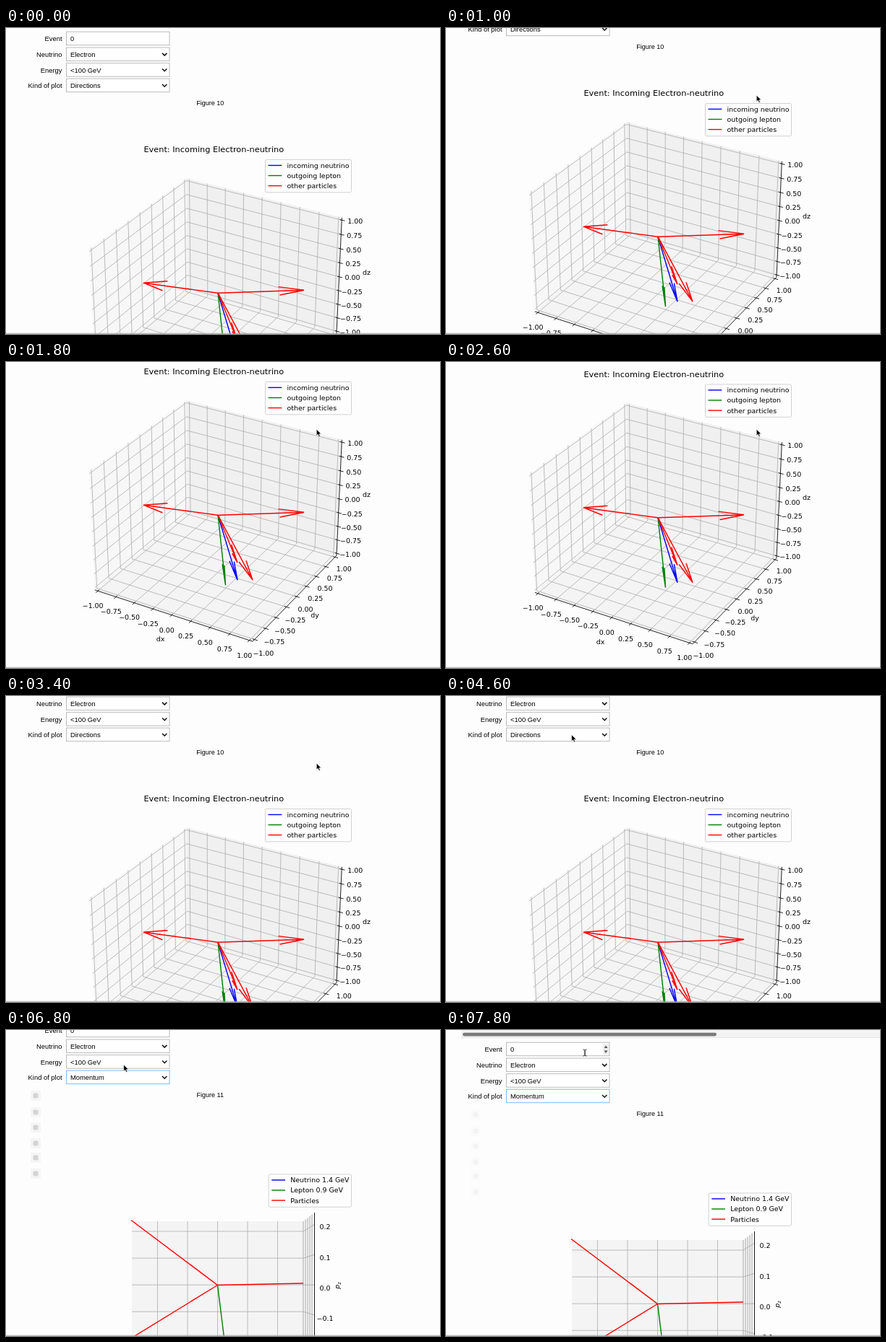
These frames come from a looping animation (600x424 px, 8000 ms). An HTML page:

```html
<!DOCTYPE html>
<html lang="en">
<head>
<meta charset="utf-8">
<title>Neutrino event viewer</title>
<style>
  html, body { margin: 0; width: 100%; height: 100%; overflow: hidden; background: #fdfdfd; }
  svg { display: block; width: 600px; height: 424px; }
  .ui { font: 9.4px "Liberation Sans", Arial, sans-serif; }
  .plot { font: 9.43px "DejaVu Sans", sans-serif; }
</style>
</head>
<body>
<svg id="stage" viewBox="0 0 600 424"></svg>
<script>
const LOOP = 8000, STEP = 200;
const stage = document.getElementById('stage');

function add(parent, tag, attrs = {}, content) {
  const node = document.createElementNS('http://www.w3.org/2000/svg', tag);
  for (const key in attrs) node.setAttribute(key, attrs[key]);
  if (content !== undefined) node.textContent = content;
  parent.append(node);
  return node;
}
const group = (parent, cls = '') => add(parent, 'g', { class: cls });
const path = (parent, d, stroke, width = 0.85, fill = 'none') =>
  add(parent, 'path', { d, stroke, 'stroke-width': width, fill });
const rect = (parent, x, y, width, height, attrs) =>
  add(parent, 'rect', { x, y, width, height, ...attrs });
// y is the vertical middle of the capitals
const label = (parent, x, y, content, anchor = 'middle', attrs = {}) =>
  add(parent, 'text', { x, y: y + 3.4, 'text-anchor': anchor, fill: '#000', ...attrs }, content);
const poly = points => 'M' + points.map(p => p.map(v => v.toFixed(2)).join()).join('L');
const show = (node, on) => node.setAttribute('display', on ? 'inline' : 'none');
const move = (node, x, y) => node.setAttribute('transform', `translate(${x} ${y})`);

const page = group(stage);

// Form controls
const form = group(page, 'ui');
rect(form, 21, -14, 579, 12.5, { fill: '#f3f3f3' });
path(form, 'M21-1.5H600', '#e2e2e2');
rect(form, 23, -8.2, 351, 4.6, { rx: 2.3, fill: '#7b7b7b' });

function field(name, value, y, isSelect) {
  label(form, 77.5, y, name, 'end');
  const box = rect(form, 83.5, y - 9.5, 142.5, 18.5, { fill: '#fff', stroke: '#b4b4b4', 'stroke-width': 0.9 });
  const text = label(form, 89, y, value, 'start');
  if (isSelect) path(form, `M216 ${y - 1.7}l3.2 3.2 3.2-3.2`, '#111', 1.5);
  return { box, text };
}
field('Event', '0', 14.7, false);
field('Neutrino', 'Electron', 36.6, true);
field('Energy', '<100 GeV', 58.2, true);
const kind = field('Kind of plot', 'Directions', 79.7, true);

const spinner = group(form);
rect(spinner, 217, 7.5, 8, 14.5, { fill: '#eee' });
path(spinner, 'M218.5 13l2.5-3.4 2.5 3.4zM218.5 16.5l2.5 3.4 2.5-3.4z', 'none', 0, '#555');
const figureName = label(form, 282.3, 104, 'Figure 10', 'middle', { 'font-size': 9 });

const toolbar = group(page);
for (const y of [105, 128, 149, 171, 191, 213]) {
  rect(toolbar, 34, y - 7, 14, 14, { fill: '#ddd', rx: 1 });
  rect(toolbar, 37.5, y - 3.5, 7, 7, { fill: '#555', rx: 2 });
}

function legend(parent, x, y, width, names) {
  rect(parent, x, y, width, 45.3, { rx: 2, fill: '#fff', 'fill-opacity': 0.8, stroke: '#ccc', 'stroke-width': 0.9 });
  names.forEach((name, i) => {
    const row = y + 7.9 + i * 14.1;
    path(parent, `M${x + 4} ${row}h18.8`, ['blue', 'green', 'red'][i], 1.41);
    label(parent, x + 30, row, name, 'start');
  });
}

// Directions: perspective view, elevation 30 and azimuth -60 degrees
const directions = group(page, 'plot');
const ORIGIN = [293, 367.2], EDGE = 1 + 1 / 24;

function project(x, y, z) {
  x *= 4 / 7; y *= 4 / 7; z *= 3 / 7;
  const scale = 2100 / (10 - 0.433 * x + 0.75 * y - 0.5 * z);
  return [ORIGIN[0] + scale * (0.866 * x + 0.5 * y),
          ORIGIN[1] - scale * (-0.25 * x + 0.433 * y + 0.866 * z)];
}
const line3d = (points, ...style) => path(directions, poly(points.map(p => project(...p))), ...style);

function drawDirections() {
  const e = EDGE;
  line3d([[-e, -e, -e], [-e, e, -e], [-e, e, e], [-e, -e, e]], 'none', 0, '#f7f7f7');
  line3d([[-e, e, -e], [e, e, -e], [e, e, e], [-e, e, e]], 'none', 0, '#f0f0f1');
  line3d([[-e, -e, -e], [e, -e, -e], [e, e, -e], [-e, e, -e]], 'none', 0, '#f4f4f5');
  const ticks = Array.from({ length: 9 }, (_, i) => (i - 4) / 4);
  for (const t of ticks) {
    line3d([[t, -e, -e], [t, e, -e], [t, e, e]], '#b0b0b0');
    line3d([[e, t, -e], [-e, t, -e], [-e, t, e]], '#b0b0b0');
    line3d([[e, e, t], [-e, e, t], [-e, -e, t]], '#b0b0b0');
  }
  line3d([[-e, -e, -e], [e, -e, -e], [e, e, -e]], '#000');
  line3d([[e, e, -e], [e, e, e]], '#000');
  const inner = e - 0.025, outer = e + 0.04;
  for (const t of ticks) {
    line3d([[t, -inner, -e], [t, -outer, -e]], '#000');
    line3d([[inner, t, -e], [outer, t, -e]], '#000');
    line3d([[inner, e, t], [outer, e, t]], '#000');
    const name = t.toFixed(2).replace('-', '\u2212');
    const tickLabel = (point, dx, dy) => label(directions, point[0] + dx, point[1] + dy, name);
    tickLabel(project(t, -e, -e), -6.8, 20.5 + 0.3 * t);
    tickLabel(project(e, t, -e), 12.3, 17.5 - 1.5 * t);
    tickLabel(project(e, e, t), 18.5, 1.3);
  }
  label(directions, 213.5, 539, 'dx');
  label(directions, 427, 506, 'dy');
  label(directions, 498.5, 339, 'dz');

  // tip relative to the origin, and the barbs' spread to either side of the shaft
  const arrows = [
    ['blue', [27, 90], [3.2, 0.4]],
    ['green', [10.5, 97], [1.4, 1]],
    ['red', [-103, -14], [3.5, -6.5]],
    ['red', [119, -4], [1, 5.7]],
    ['red', [27, 66], [0.5, 6]],
    ['red', [48, 90], [4.9, -0.9]],
  ];
  for (const [color, tip, spread] of arrows) {
    const at = (along, side) => ORIGIN.map((v, i) => v + along * tip[i] + side * spread[i]);
    path(directions, poly([ORIGIN, at(1, 0)]) + poly([at(0.71, -1), at(1, 0), at(0.71, 1)]), color, 1.41);
  }

  label(directions, 287.3, 168, 'Event: Incoming Electron-neutrino', 'middle', { 'font-size': 11.32, dy: 0.7 });
  legend(directions, 358.5, 182.5, 119, ['incoming neutrino', 'outgoing lepton', 'other particles']);
}
drawDirections();

// Momentum: side view
const momentum = group(page, 'plot');
function drawMomentum() {
  const left = 174, right = 411, top = 279, bottom = 520;
  path(momentum, `M${left} ${top}H${right}V${bottom}H${left}z`, 'none', 0, '#f4f4f4');
  path(momentum, `M${right} ${top}L426.5 267V${bottom}H${right}z`, 'none', 0, '#f9f9f9');
  for (let i = 0; i < 5; i++) {
    path(momentum, `M${209.5 + i * 41.5} ${top}V${bottom}`, '#b0b0b0');
    const y = 293 + i * 37.1;
    path(momentum, `M${left} ${y}H${right}l15.5 ${(y - 367.5) * 0.13}`, '#b0b0b0');
    label(momentum, 441, 287 + i * 42.2, (0.2 - i * 0.1).toFixed(1).replace('-', '\u2212'));
  }
  for (let i = 0; i < 5; i++)
    path(momentum, `M${right + i * 3} ${top - i * 2.3}V${bottom}`, '#999');
  path(momentum, `M426.5 267V${bottom}`, '#000', 0.9);
  const axis = label(momentum, 0, 0, 'p', 'middle', { 'font-style': 'italic', transform: 'translate(458 368) rotate(-90)' });
  add(axis, 'tspan', { dy: 1.6, 'font-size': 6.6 }, 'z');
  path(momentum, 'M292.5 367.5l14 113', 'green', 1.41);
  path(momentum, 'M173 277.5L292.5 367.5L411 365M292.5 367.5l-118 72.6', 'red', 1.41);
  legend(momentum, 363.2, 214, 114.3, ['Neutrino 1.4 GeV', 'Lepton 0.9 GeV', 'Particles']);
}
drawMomentum();

// Fixed overlay: window edge, drop-down menu, pointers
path(stage, 'M0 423.3H600', '#a8a8a8', 1.1);
const menu = group(stage, 'ui');
rect(menu, 72, 43.5, 154, 50, { rx: 4, fill: '#f4f4f4', stroke: '#ccc', 'stroke-width': 0.8 });
const highlight = rect(menu, 75, 0, 148, 19, { rx: 3, fill: '#3b82f0' });
path(menu, 'M78 53.5l2.2 2.6 3.6-5.6', '#111', 1.2);
label(menu, 89, 53.7, 'Directions', 'start');
label(menu, 89, 77, 'Momentum', 'start');

const arrow = path(stage, 'M0 0V9.2L2.1 7.3 3.6 10.6 5.2 9.9 3.8 6.7H6.7z', '#fff', 0.7, '#000');
const beam = path(stage, 'M-2.5-4.5Q0-4.5 0-3V3Q0 4.5-2.5 4.5M2.5-4.5Q0-4.5 0-3V3Q0 4.5 2.5 4.5', '#222', 0.9);

// Piecewise linear value through [time, value] keys
function track(keys, time) {
  const next = keys.findIndex(key => key[0] > time);
  if (next === 0) return keys[0][1];
  if (next < 0) return keys[keys.length - 1][1];
  const [[t0, v0], [t1, v1]] = [keys[next - 1], keys[next]];
  return v0 + (v1 - v0) * (time - t0) / (t1 - t0);
}
const SCROLL = [[0, 0], [200, -3], [400, -12], [600, -28], [800, -51], [1000, -78], [1200, -116],
  [1400, -141], [1600, -152], [1800, -155], [2400, -155], [2600, -151.5], [2800, -125], [3000, -80],
  [3200, -42], [3400, -26], [6600, -26], [6800, -14], [7200, 9], [7600, 12]];
const POINTER_X = [[3600, 429.2], [4000, 395], [4400, 235], [4800, 112], [5400, 108], [6000, 118], [7200, 185], [7800, 192]];
const POINTER_Y = [[3600, 93], [4000, 82], [4400, 56], [4800, 51], [5400, 65.5], [6000, 72], [7200, 36], [7800, 31.5]];
const MENU_ALPHA = [[4600, 0], [4800, 1], [5200, 1], [5400, 0.03], [5600, 0]];
const TOOLBAR_ALPHA = [[5400, 0], [5800, 0.3], [6600, 0.3], [7400, 0.05]];

function draw(time) {
  move(page, 0, track(SCROLL, time));
  const isMomentum = time >= 6200;
  show(directions, !isMomentum);
  show(momentum, isMomentum);
  figureName.textContent = isMomentum ? 'Figure 11' : 'Figure 10';
  kind.text.textContent = time >= 5600 ? 'Momentum' : 'Directions';
  kind.box.setAttribute('stroke', time >= 4800 ? '#72b3f5' : '#b4b4b4');
  menu.setAttribute('opacity', track(MENU_ALPHA, time));
  highlight.setAttribute('y', time >= 5200 ? 67.5 : 44.5);
  toolbar.setAttribute('opacity', track(TOOLBAR_ALPHA, time));

  const x = track(POINTER_X, time), y = track(POINTER_Y, time);
  const overEvent = time >= 7200;
  show(spinner, overEvent);
  show(beam, overEvent);
  show(arrow, time >= 200 && !overEvent);
  move(arrow, x, y);
  move(beam, x, y);
}

function tick() {
  draw(Math.floor(performance.now() % LOOP / STEP) * STEP);
  requestAnimationFrame(tick);
}
tick();
</script>
</body>
</html>
```
